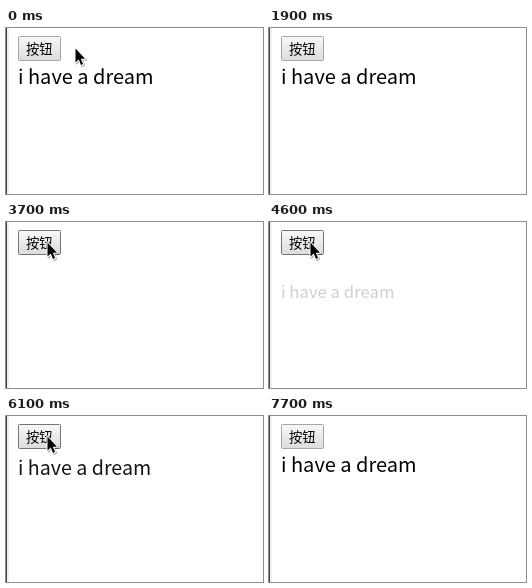
Recreate the animation shown at these times as an HTML page. Size 257 by 166 pixels, loop 8700 ms.

```html
<!DOCTYPE html>
<html lang="zh">
<meta charset="utf-8">
<title>Fade-in text</title>
<style>
  html, body { margin: 0; width: 100%; height: 100%; overflow: hidden; background: #fff; }
  svg { display: block; }
  text { font-family: "Noto Sans CJK SC", "Noto Sans CJK", "Noto Sans", sans-serif; }
  #button { fill: url(#normal); stroke: #a6a6a6; }
  #button.hover { stroke: #757575; }
  #button.active { fill: url(#pressed); stroke: #757575; }
</style>
<svg width="257" height="166">
  <defs>
    <linearGradient id="normal" x2="0" y2="1">
      <stop stop-color="#f8f8f8"/><stop offset="1" stop-color="#dcdcdc"/>
    </linearGradient>
    <linearGradient id="pressed" x2="0" y2="1">
      <stop stop-color="#d6d6d6"/><stop offset="1" stop-color="#f4f4f4"/>
    </linearGradient>
    <path id="arrow" d="M1.500 1.500V15.500L4.800 12.500L7 18L9 17L6.800 11.800H11Z"/>
  </defs>
  <rect x="1" width="2" height="166" fill="#f0f0f0"/>
  <rect width="1" height="166" fill="#444"/>
  <rect id="button" x="12.5" y="8.5" width="42" height="24" rx="1"/>
  <text x="20" y="26" font-size="13.333">按钮</text>
  <text id="message" x="12">i have a dream</text>
  <g id="cursor" stroke-linejoin="round">
    <use href="#arrow" x="1" y="1" stroke="#000" stroke-width="2" opacity=".3"/>
    <use href="#arrow" stroke="#fff" stroke-width="2"/>
    <use href="#arrow"/>
  </g>
</svg>
<script>
const LOOP = 8700, STEP = 100, MOVE = 300;
const HIDE = 2700, SHOW = 4150, DURATION = 3000;

// arrival time, x, y
const stops = [
  [0, 68, 19], [400, 40, 19], [800, 178, 24], [1300, 115, 18], [1700, 82, 15],
  [2600, 40, 19], [3100, 37, 45], [3400, 54, 35], [3700, 40, 19], [7800, 54, -5]
];

const [button, message, cursor] =
  ["button", "message", "cursor"].map(id => document.getElementById(id));
const within = (t, from, to) => t >= from && t < to;

// cubic-bezier(.25, .1, .25, 1)
function ease(x) {
  if (x >= 1) return 1;
  let low = 0, high = 1, s;
  for (let i = 0; i < 20; i++) {
    s = (low + high) / 2;
    if (0.75 * s * (1 - s) + s ** 3 < x) low = s; else high = s;
  }
  return 0.3 * s * (1 - s) ** 2 + 3 * s * s * (1 - s) + s ** 3;
}

function drawMessage(t) {
  const p = t < HIDE ? 1 : t < SHOW ? 0 : ease((t - SHOW) / DURATION);
  const size = 16 + 4 * p;
  const ascent = Math.round(1.16 * size);
  message.setAttribute("font-size", size);
  message.setAttribute("y", Math.round(33 + ascent + 30 * (1 - p)));
  message.setAttribute("opacity", p);
}

function pointerAt(t) {
  let [, x, y] = stops[0];
  for (const [end, toX, toY] of stops) {
    const rest = 1 - Math.min(1, Math.max(0, (t - end) / MOVE + 1));
    const p = 1 - rest * rest;
    x += (toX - x) * p;
    y += (toY - y) * p;
  }
  return [Math.round(x), Math.round(y)];
}

function drawPointer(t) {
  const [x, y] = pointerAt(t);
  const visible = t < 7700 && !within(t, 1900, 2600);
  const over = visible && within(x, 11, 54) && within(y, 7, 32);
  const down = within(t, 2600, HIDE) || within(t, 4000, 4200);
  cursor.setAttribute("visibility", visible ? "visible" : "hidden");
  cursor.setAttribute("transform", `translate(${x} ${y})`);
  button.setAttribute("class", down ? "active" : over ? "hover" : "");
}

const start = performance.now();
function frame() {
  const elapsed = (performance.now() - start) % LOOP;
  const t = Math.floor(elapsed / STEP) * STEP;
  drawMessage(t);
  drawPointer(t);
  requestAnimationFrame(frame);
}
frame();
</script>
</html>
```
